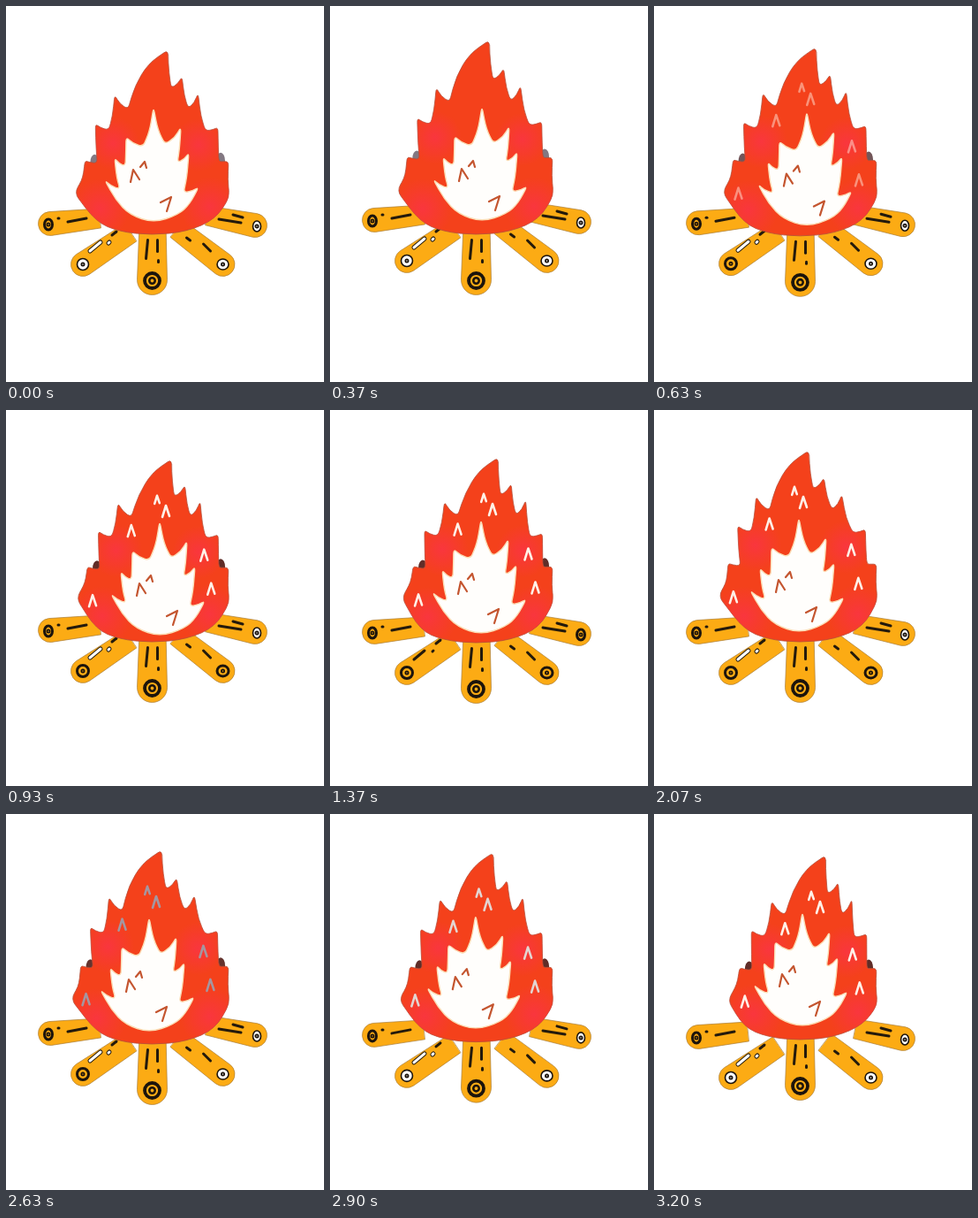
Animation of 360x425 px, one loop 3.23 s. Source, as an HTML page with a canvas:

```html
<!DOCTYPE html>
<html lang="en">
<head>
<meta charset="utf-8">
<title>Campfire</title>
<style>
  html, body { margin: 0; width: 100%; height: 100%; overflow: hidden; background: #fff; }
  canvas { display: block; width: 360px; height: 425px; }
</style>
</head>
<body>
<canvas id="stage"></canvas>
<script>
const LOOP = 3230;

// Key poses: time, flame top, core top, flame bottom, height of the side logs
const POSES = [
  { at: 0, top: [183, 52], core: [167, 117], bottom: 257, side: 246 },
  { at: 370, top: [180, 41], core: [172, 116], bottom: 257, side: 242 },
  { at: 930, top: [187, 58], core: [174, 128], bottom: 261, side: 249 },
  { at: 1370, top: [190, 56], core: [171, 126], bottom: 262, side: 251 },
  { at: 2070, top: [175, 48], core: [164, 124], bottom: 261, side: 251 },
  { at: 2630, top: [176, 43], core: [162, 119], bottom: 259, side: 248 },
  { at: 3200, top: [194, 49], core: [168, 113], bottom: 254, side: 252 }
];

// Tips of the upright flame, whose top is at REST
const REST = [184, 50];
const LEFT = [[124, 101], [102, 134], [90, 176], [79, 211]];
const RIGHT = [[200, 80], [218, 99], [240, 138], [252, 177], [253, 216]];

// Outer end (dy from the side height), vector to the fire, end radius, inner half width, dashes
const LOGS = [
  { x: 50, dy: 0, to: [56, -6], r: 13.5, w: 11, ring: [-2, 1, 4.5, 6],
    dashes: [[20, -2, 41, -6], [9, -6, 10, -6]] },
  { x: 87, dy: 46, to: [54, -36], r: 13.5, w: 12, ring: [0, 0, 6.5, 6.5], paleDash: 1200, paleEnd: 500,
    dashes: [[8, -15, 20, -25], [29, -24, 30, -25], [33, -33, 38, -37]] },
  { x: 245.5, dy: 46, to: [-52, -40], r: 13.5, w: 12, ring: [0, 0, 6.5, 6], paleEnd: 700,
    dashes: [[-41, -30, -37, -27], [-22, -23, -14, -15]] },
  { x: 282, dy: 2, to: [-54, -11], r: 13.5, w: 11, ring: [2, 1, 4.5, 6], paleEnd: 1200,
    dashes: [[-41, -7, -16, -3], [-25, -12, -14, -9]] }
];
const FRONT_LOG = { x: 165.5, to: [.5, -62], r: 17, w: 15, ring: [0, 1, 8.5, 8.5], big: true,
  dashes: [[-5, -45, -7, -24], [6, -45, 6, -32], [7, -22, 7, -20]] };

const canvas = document.getElementById('stage');
const ctx = canvas.getContext('2d');
const dpr = window.devicePixelRatio || 1;
canvas.width = 360 * dpr;
canvas.height = 425 * dpr;
ctx.scale(dpr, dpr);
ctx.lineCap = ctx.lineJoin = 'round';

const clamp = v => Math.max(0, Math.min(1, v));
const lerp = (a, b, k) => Array.isArray(a) ? a.map((v, i) => lerp(v, b[i], k)) : a + (b - a) * k;
const bump = (t, center, width) => Math.exp(-(((t - center) / width) ** 2));

function poseAt(t) {
  let i = 0;
  while (i < POSES.length - 2 && t >= POSES[i + 1].at) i++;
  const a = POSES[i], b = POSES[i + 1];
  const k = (t - a.at) / (b.at - a.at);
  return Object.fromEntries(Object.keys(a).map(key => [key, lerp(a[key], b[key], k)]));
}

// Outline corners are [x, y, cut, lick]; sides between two lick corners sag inward
const tip = ([x, y]) => [x, y - 2, 5, true];
const dip = ([x, y], dx, dy) => [x + dx, y + dy, 5, true];
const bend = (x, y, cut = 20) => [x, y, cut, false];

function sag(p, q) {
  const [high, low] = p[1] < q[1] ? [p, q] : [q, p];
  const mid = lerp(p.slice(0, 2), q.slice(0, 2), .5);
  return [...lerp(mid, [high[0], low[1]], .24), 12];
}

function outline(corners) {
  const pts = corners.flatMap((p, i) => {
    const q = corners[(i + 1) % corners.length];
    return p[3] && q[3] ? [p, sag(p, q)] : [p];
  });
  const toward = (p, q) => {
    const len = Math.hypot(q[0] - p[0], q[1] - p[1]) || 1;
    return lerp(p.slice(0, 2), q.slice(0, 2), Math.min(p[2] / len, .5));
  };
  ctx.beginPath();
  pts.forEach((p, i) => {
    ctx.lineTo(...toward(p, pts.at(i - 1)));
    ctx.quadraticCurveTo(p[0], p[1], ...toward(p, pts[(i + 1) % pts.length]));
  });
  ctx.closePath();
}

function paint(fill, stroke, width) {
  ctx.fillStyle = fill;
  ctx.fill();
  ctx.strokeStyle = stroke;
  ctx.lineWidth = width;
  ctx.stroke();
}

function lines(color, width, ...pts) {
  ctx.beginPath();
  pts.forEach(p => ctx.lineTo(...p));
  ctx.strokeStyle = color;
  ctx.lineWidth = width;
  ctx.stroke();
}

function drawLog({ x, to, r, w, ring, dashes, big, paleEnd = 0, paleDash = 0 }, y, t) {
  const fromStart = Math.min(t, LOOP - t);
  const len = Math.hypot(...to);
  ctx.save();
  ctx.translate(x, y);
  ctx.save();
  ctx.rotate(Math.atan2(to[1], to[0]));
  ctx.beginPath();
  ctx.moveTo(len, -w);
  ctx.lineTo(0, -r);
  ctx.arc(0, 0, r, -Math.PI / 2, Math.PI / 2, true);
  ctx.lineTo(len, w);
  ctx.closePath();
  ctx.restore();
  paint('#fcab14', '#a87d3c', .7);

  dashes.forEach(([x1, y1, x2, y2], i) => {
    const pale = fromStart < paleDash && i < 2;
    lines('#241a0c', pale ? 5 : 3, [x1, y1], [x2, y2]);
    if (pale) lines('#fff', 3, [x1, y1], [x2, y2]);
  });

  const [cx, cy, rx, ry] = ring;
  const pale = fromStart < paleEnd;
  ctx.beginPath();
  ctx.ellipse(cx, cy, rx, ry, 0, 0, 7);
  paint(pale ? '#fff' : '#fcab14', '#1c140c', pale ? 1.6 : big ? 3.8 : 3);
  ctx.beginPath();
  ctx.arc(cx, cy, big ? 3.2 : 1.6, 0, 7);
  ctx.lineWidth = big ? 2.6 : 1.8;
  ctx.stroke();
  ctx.restore();
}

function glow(x, y, r) {
  const g = ctx.createRadialGradient(x, y, 0, x, y, r);
  g.addColorStop(0, 'rgba(250,52,68,.85)');
  g.addColorStop(1, 'rgba(250,52,68,0)');
  ctx.fillStyle = g;
  ctx.fillRect(x - r, y - r, r * 2, r * 2);
}

// Low tips follow the top less; the right side soon stands still
function flameTips([topX, topY]) {
  const sway = follow => ([x, y]) => {
    const depth = y - REST[1];
    return [
      x + (topX - REST[0]) * clamp(follow(depth)),
      y + (topY - REST[1]) * clamp(1 - depth / 210)
    ];
  };
  return {
    left: LEFT.map(sway(d => 1.1 - d / 300)),
    right: RIGHT.map(sway(d => 1.25 - d / 75))
  };
}

function drawFlame(top, { left, right }, bottom, t) {
  const [L1, L2, L3, L4] = left;
  const [R1, R2, R3, R4, R5] = right;
  const [x, y] = top;

  const shade = lerp([130, 120, 130], [95, 45, 40], clamp((t - 400) / 500));
  ctx.fillStyle = `rgba(${shade},${1 - bump(t, 2070, 300)})`;
  [[L3[0] + 11, L3[1]], [R4[0] - 9, R4[1] - 3]].forEach(([nx, ny]) => {
    ctx.beginPath();
    ctx.ellipse(nx, ny, 5, 9, 0, 0, 7);
    ctx.fill();
  });

  outline([
    tip(top), bend(x - 22, y + 13, 16), bend(x - 37, y + 38, 16),
    dip(L1, 15, 14), tip(L1), dip(L2, 15, 5), tip(L2),
    dip(L3, 14, 1), tip(L3), dip(L4, 7, -14), bend(L4[0] - 1, L4[1], 8),
    bend(102, bottom - 13), bend(128, bottom - 2), bend(165, bottom + 2),
    bend(205, bottom - 2), bend(237, bottom - 16), bend(R5[0], R5[1], 8),
    bend(R4[0] - 1, R4[1] + 18, 9), tip(R4), dip(R4, -11, -2),
    tip(R3), dip(R3, -14, 2), tip(R2), dip(R2, -11, 15), tip(R1), dip(R1, -12, 11)
  ]);
  paint('#f4411b', '#b4503a', .8);
  ctx.save();
  ctx.clip();
  glow(L2[0] + 20, L2[1] + 20, 30);
  glow(R3[0] - 22, R3[1] + 18, 30);
  glow(L4[0] + 28, bottom - 28, 34);
  glow(R5[0] - 22, bottom - 30, 34);
  ctx.restore();
}

function drawCore([x, y]) {
  const at = (dx, dy) => [x + dx, y + dy];
  const l1 = at(-31, 33), l2 = at(-44, 57), l3 = at(-55, 82);
  const r1 = at(31, 22), r2 = at(40, 51), r3 = at(51, 90);
  outline([
    tip([x, y]), dip(l1, 19, 9), tip(l1), dip(l2, 12, 7), tip(l2), dip(l3, 17, 8), tip(l3),
    bend(x - 43, y + 102), bend(x - 27, y + 119), bend(x, y + 128), bend(x + 28, y + 119),
    bend(x + 41, y + 107), tip(r3), dip(r3, -17, 4), tip(r2), dip(r2, -13, 9),
    tip(r1), dip(r1, -18, 17)
  ]);
  paint('#fffefc', '#fbdcb4', 1.4);

  const red = (...pts) => lines('#c4552f', 2.2, ...pts.map(p => at(...p)));
  red([-26, 82], [-23, 68], [-16, 79]);
  red([-15, 65], [-10, 59], [-8, 66]);
  red([8, 105], [20, 99], [15, 115]);
}

// Pale carets fade in early in the loop and turn grey for a moment near its end
function drawSparks([x, y], { left, right }, t) {
  const [L1, , L3] = left, R3 = right[2];
  const tone = lerp([255, 242, 232], [165, 150, 160], bump(t, 2630, 250));
  const color = `rgba(${tone},${clamp((t - 370) / 560)})`;
  const spots = [
    [x - 6, y + 56], [x - 16, y + 43, .7], [L1[0] + 15, L1[1] + 29],
    [R3[0] - 16, R3[1] + 21], [R3[0] - 8, R3[1] + 59], [L3[0] + 6, L3[1] + 36]
  ];
  spots.forEach(([sx, sy, s = 1]) =>
    lines(color, 2.6, [sx - 4 * s, sy + 7 * s], [sx, sy - 6 * s], [sx + 4 * s, sy + 6 * s]));
}

function draw(t) {
  const { top, core, bottom, side } = poseAt(t);
  const tips = flameTips(top);
  ctx.fillStyle = '#fff';
  ctx.fillRect(0, 0, 360, 425);
  LOGS.forEach(log => drawLog(log, side + log.dy, t));
  drawLog(FRONT_LOG, bottom + 52.5, t);
  drawFlame(top, tips, bottom, t);
  drawSparks(top, tips, t);
  drawCore(core);
}

const start = performance.now();
function tick() {
  const t = (performance.now() - start) % LOOP;
  const step = Math.floor((t + 3.4) * .03);
  draw(Math.min(Math.round(step * 10 / 3) * 10, 3200));
  requestAnimationFrame(tick);
}
tick();
</script>
</body>
</html>
```
